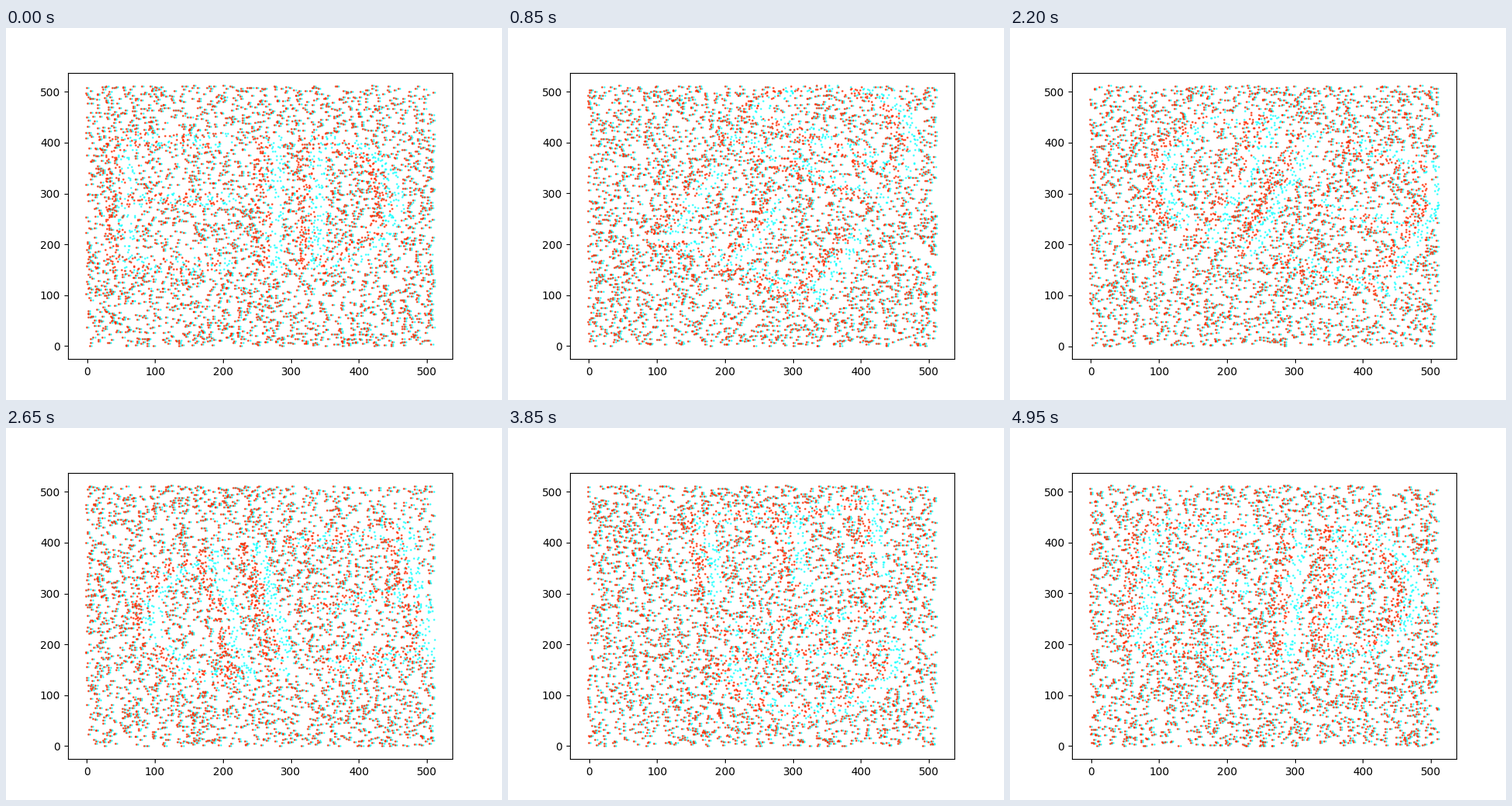
A matplotlib script that plays this animation: 640x480 px, repeating every 5000 ms.

```python
import numpy as np
import matplotlib.pyplot as plt
from matplotlib.animation import FuncAnimation

FRAMES = 100
INTERVAL = 50
FIELD = 512
DOTS = 4000
FAR_SHIFT = 2.4
NEAR_SHIFT = 18
HALF_STROKE = 14
TOP = 122

# Drift of the lettering's centre: frame, x, y
DRIFT = np.array([
    (0, 249, 283), (17, 312, 322), (28, 265, 283), (44, 307, 297),
    (53, 300, 272), (77, 315, 272), (99, 270, 305),
])


def letter_strokes():
    """Centre lines of the three letters, around their common centre."""
    bars = [[(-190, y), (-45, y)] for y in (TOP, 5, -TOP)]
    stems = [[(x, -TOP), (x, TOP)] for x in (-190, 27, 90)]
    turn = np.linspace(-np.pi / 2, np.pi / 2, 17)
    bowl = np.column_stack([90 + 115 * np.cos(turn), TOP * np.sin(turn)])
    return [np.array(line, dtype=float) for line in bars + stems + [bowl]]


STROKES = letter_strokes()


def near_segment(points, a, b):
    along = b - a
    t = np.clip((points - a) @ along / (along @ along), 0, 1)
    gap = points - a - t[:, None] * along
    return np.hypot(*gap.T) < HALF_STROKE


def inside_text(points, frame):
    """True for the points covered by the turned and shifted lettering."""
    keys, xs, ys = DRIFT.T
    centre = [np.interp(frame, keys, v, period=FRAMES) for v in (xs, ys)]
    angle = 2 * np.pi * frame / FRAMES
    c, s = np.cos(angle), np.sin(angle)
    local = (points - centre) @ np.array([[c, -s], [s, c]])
    inside = np.zeros(len(points), dtype=bool)
    for line in STROKES:
        for a, b in zip(line, line[1:]):
            inside |= near_segment(local, a, b)
    return inside


fig, ax = plt.subplots(figsize=(6.4, 4.8), dpi=100)


def draw(frame):
    rng = np.random.default_rng(1000 + frame)
    points = rng.uniform(0, FIELD, (DOTS, 2))
    shift = np.where(inside_text(points, frame), NEAR_SHIFT, FAR_SHIFT)
    x, y = points.T
    ax.clear()
    ax.scatter(x, y, s=1, c="cyan", alpha=0.6)
    ax.scatter(x - shift, y, s=1, c="#ff2a00", alpha=0.7)
    # The near layer may leave the field; keep the view on the field itself.
    left, right = (x - FAR_SHIFT).min(), x.max()
    pad = 0.05 * (right - left)
    ax.set_xlim(left - pad, right + pad)
    return ax.collections


anim = FuncAnimation(fig, draw, frames=FRAMES, interval=INTERVAL,
                     init_func=lambda: [], repeat=True, repeat_delay=0)

plt.show()
```
